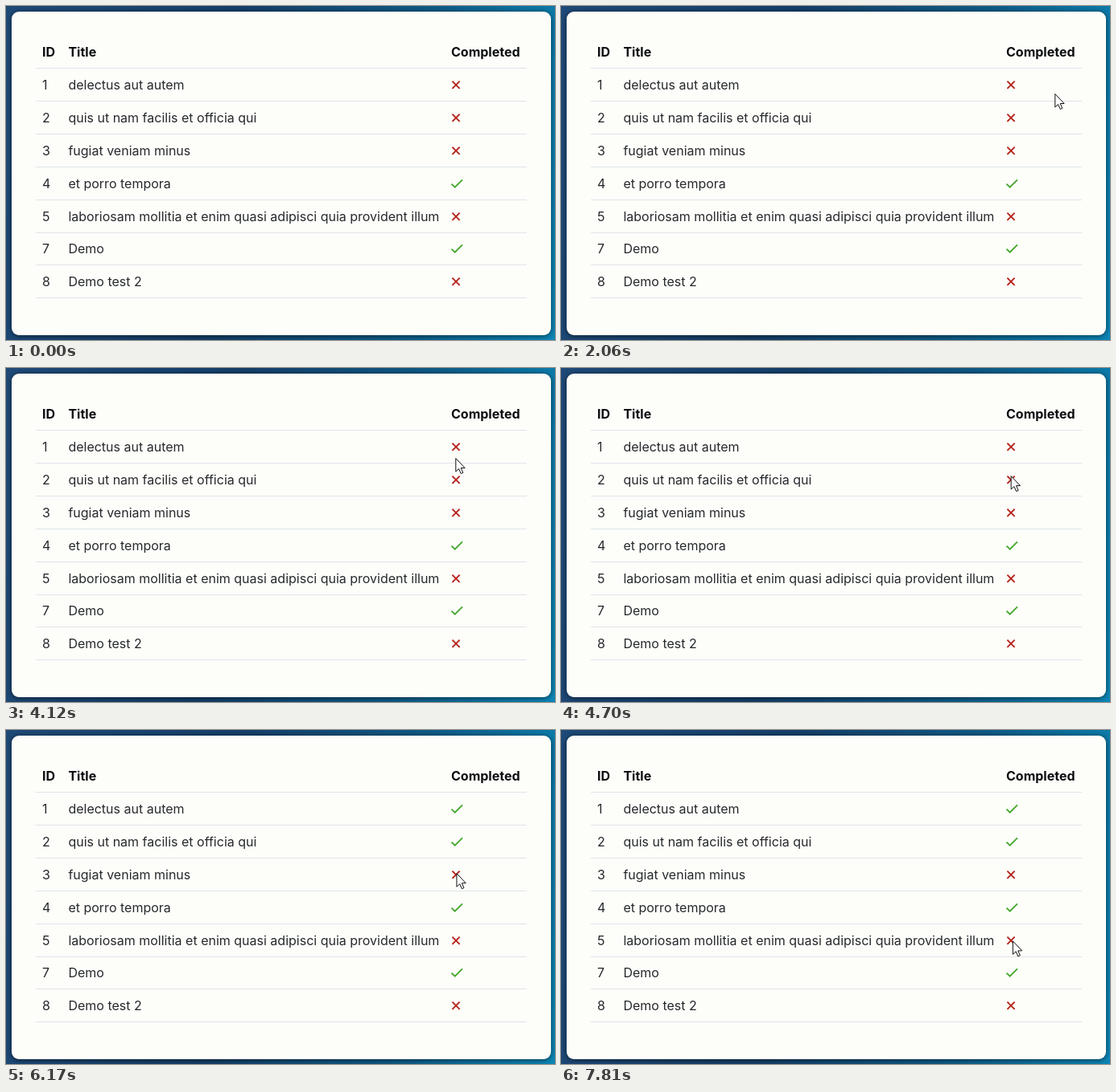
Recreate the animation shown at these times as an HTML page. Size 682 px wide and 416 px high, loop 8000 ms.

```html
<!DOCTYPE html>
<html lang="en">
<head>
<meta charset="utf-8">
<title>Todo table</title>
<style>
  html, body { margin: 0; width: 100%; height: 100%; overflow: hidden; }
  body { background: linear-gradient(98deg, #1f4a78 0, #153f69 40%, #0f5b86 72%, #0c7dac 94%, #0d86b6 100%); }
  .card {
    position: absolute; left: 7px; top: 7px; width: 670px; height: 403px;
    border-radius: 9px; background: #fdfefa; box-shadow: 0 1px 6px rgba(0, 0, 0, .6);
  }
  svg { position: absolute; left: 0; top: 0; width: 682px; height: 416px; }
  text { font: 400 16px Inter, sans-serif; fill: #26292c; }
  .head { font-weight: 700; fill: #0b0d10; }
  .line { fill: #e0e4ea; }
  .mark { fill: none; stroke-width: 1.9; }
  .cross { stroke: #b5221a; }
  .tick { stroke: #45a82c; }
</style>
</head>
<body>
<div class="card"></div>
<svg id="stage" viewBox="0 0 682 416"></svg>
<script>
const LOOP = 8000, PITCH = 40.86, ROLLBACK = 800;
const CROSS = 'M-4.6 -4.6L4.6 4.6M4.6 -4.6L-4.6 4.6';
const TICK = 'M-5.6 .4L-1.3 4.5L8 -4.8';

const rows = [
  { id: 1, title: 'delectus aut autem' },
  { id: 2, title: 'quis ut nam facilis et officia qui' },
  { id: 3, title: 'fugiat veniam minus' },
  { id: 4, title: 'et porro tempora', done: true },
  { id: 5, title: 'laboriosam mollitia et enim quasi adipisci quia provident illum' },
  { id: 7, title: 'Demo', done: true },
  { id: 8, title: 'Demo test 2' }
];

// A failed click is undone after ROLLBACK
const clicks = [
  { at: 3060, row: 0, fails: true },
  { at: 5100, row: 0 },
  { at: 5750, row: 1 },
  { at: 6380, row: 2, fails: true }
];

// Pointer trips to a row; bulge bends the way to the right
const trips = [
  { from: 1530, to: 2520, row: 0 },
  { from: 3900, to: 4400, row: .92 },
  { from: 4710, to: 5000, row: 0 },
  { from: 5300, to: 5660, row: .92 },
  { from: 5880, to: 6160, row: 2 },
  { from: 7430, to: 7800, row: 4.06, bulge: 60 }
];

const stage = document.getElementById('stage');

function add(tag, attrs, label) {
  const el = document.createElementNS('http://www.w3.org/2000/svg', tag);
  for (const name in attrs) el.setAttribute(name, attrs[name]);
  if (label !== undefined) el.textContent = label;
  return stage.appendChild(el);
}

const lineY = i => Math.round(77.3 + PITCH * i);

function addRow(i, cells, cls) {
  const y = lineY(i);
  add('rect', { x: 37, y, width: 610, height: 1, class: 'line' });
  cells.forEach((label, c) => add('text', { x: [45, 77.4, 553][c], y: y - 14, class: cls }, label));
}

addRow(0, ['ID', 'Title', 'Completed'], 'head');
const marks = rows.map(({ id, title }, i) => {
  addRow(i + 1, [id, title], '');
  return add('path', { transform: `translate(559 ${lineY(i + 1) - 19.8})` });
});

const pointer = add('path', {
  d: 'M0 0V16.5L3.8 13L6.4 19L9 17.9L6.4 12H11.3Z',
  fill: '#fff', stroke: '#111', 'stroke-width': 1
});

function isDone(row, t) {
  const toggled = clicks.some(c =>
    c.row === row && t >= c.at && !(c.fails && t >= c.at + ROLLBACK));
  return toggled !== !!rows[row].done;
}

function pointerAt(t) {
  let x = 682.6, y = 125;
  for (const { from, to, row, bulge = 0 } of trips) {
    const k = Math.min(1, Math.max(0, (t - from) / (to - from)));
    const e = k * k * (3 - 2 * k);
    x += (558.5 + row * .7 - x) * e + bulge * Math.sin(Math.PI * e);
    y += (97 + PITCH * row - y) * e;
  }
  return [x, y];
}

function draw(t) {
  marks.forEach((mark, i) => {
    const done = isDone(i, t);
    mark.setAttribute('d', done ? TICK : CROSS);
    mark.setAttribute('class', done ? 'mark tick' : 'mark cross');
  });
  pointer.setAttribute('transform', `translate(${pointerAt(t)})`);
}

const began = performance.now();
function frame() {
  draw((performance.now() - began) % LOOP);
  requestAnimationFrame(frame);
}
frame();
</script>
</body>
</html>
```
